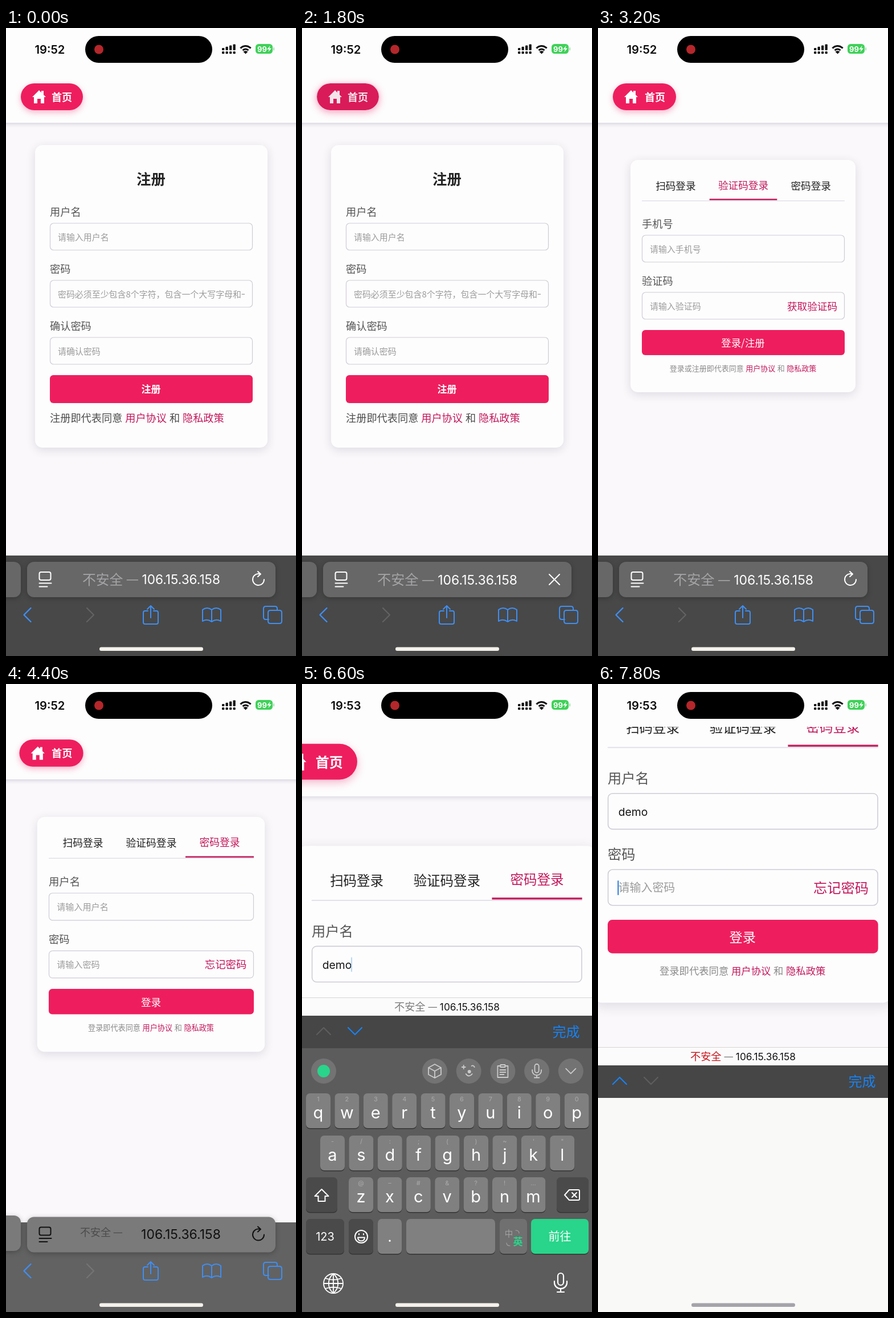
Write an HTML page with a canvas that moves like this. It is 509 px wide and 1100 px high and loops after 8 s.

```html
<!DOCTYPE html>
<html lang="zh-CN">
<head>
<meta charset="utf-8">
<title>注册与登录</title>
<style>
html, body { margin: 0; width: 100%; height: 100%; overflow: hidden; background: #faf8fa; }
canvas { display: block; width: 509px; height: 1100px; }
</style>
</head>
<body>
<canvas id="stage" width="509" height="1100"></canvas>
<script>
const ctx = document.getElementById('stage').getContext('2d');
const W = 509, H = 1100, LOOP = 8000, STEP = 200;
const CJK = '"Noto Sans CJK SC", "Noto Sans CJK", "Noto Sans", sans-serif';
const LATIN = 'Inter, "Liberation Sans", sans-serif';
const PINK = '#ee1e5e', LINK = '#c2185b', BLUE = '#3f8ef2', WHITE = '#fdfdfd';
const KEY = '#808080', DARK = '#4a4a4a', GREEN = '#28d58a';
const HOST = '106.15.36.158', TYPED = 'demo';

const clamp = u => Math.min(1, Math.max(0, u));
const inOut = u => u < .5 ? 4 * u ** 3 : 1 - (2 - 2 * u) ** 3 / 2;
const out = u => 1 - (1 - u) ** 3;
const isCjk = s => /[\u3000-\uffff]/.test(s);

function setFont(s, size, weight = 400) {
  ctx.font = `${weight} ${size}px ${isCjk(s) ? CJK : LATIN}`;
}

// y is the visual middle of the capitals
function txt(s, x, y, size, color, align = 'left', weight = 400) {
  setFont(s, size, weight);
  ctx.textAlign = align;
  ctx.fillStyle = color;
  ctx.fillText(s, x, y + size * .37);
  return ctx.measureText(s).width;
}

function runs(parts, x, y, size, centered) {
  const gap = size * .27;
  const sizes = parts.map(([s]) => s === '—' ? size * .85 : isCjk(s) ? size : size * .95);
  if (centered) {
    const total = parts.reduce((sum, [s], i) => {
      setFont(s, sizes[i]);
      return sum + ctx.measureText(s).width + gap;
    }, -gap);
    x -= total / 2;
  }
  parts.forEach(([s, color], i) => { x += txt(s, x, y, sizes[i], color) + gap; });
}

function box(x, y, w, h, r, fill, border) {
  ctx.beginPath();
  ctx.roundRect(x, y, w, h, r);
  if (fill) { ctx.fillStyle = fill; ctx.fill(); }
  if (border) { ctx.strokeStyle = border; ctx.lineWidth = 1.2; ctx.stroke(); }
}

// canvas shadows ignore the transform, so scale them here
function shadowed(color, blur, dy, draw) {
  const scale = ctx.getTransform().a;
  ctx.save();
  ctx.shadowColor = color;
  ctx.shadowBlur = blur * scale;
  ctx.shadowOffsetY = dy * scale;
  draw();
  ctx.restore();
}

function disc(x, y, r, color) {
  ctx.beginPath();
  ctx.arc(x, y, r, 0, 7);
  ctx.fillStyle = color;
  ctx.fill();
}

function icon(d, x, y, color, width = 2, filled) {
  ctx.save();
  ctx.translate(x, y);
  ctx.lineCap = ctx.lineJoin = 'round';
  ctx.lineWidth = width;
  ctx.strokeStyle = ctx.fillStyle = color;
  const path = new Path2D(d);
  filled ? ctx.fill(path) : ctx.stroke(path);
  ctx.restore();
}

const ICON = {
  house: 'M0-12L12 0H9V11H3V3H-3V11H-9V0H-12L-6-6V-6Z M4-11H8V-4L4-8Z',
  back: 'M6-12L-6 0L6 12',
  next: 'M-6-12L6 0L-6 12',
  up: 'M-12 6L0-6L12 6',
  down: 'M-12-6L0 6L12-6',
  share: 'M-5-7H-10Q-13-7-13-4V13Q-13 16-10 16H10Q13 16 13 13V-4Q13-7 10-7H5M0 5V-16M-6-10L0-16L6-10',
  book: 'M0 12Q-8 6-16 11V-9Q-8-15 0-9Q8-15 16-9V11Q8 6 0 12V-9',
  tabs: 'M-7 8H-12Q-16 8-16 4V-11Q-16-15-12-15H4Q8-15 8-11V-8M-4-8H12Q16-8 16-4V11Q16 15 12 15H-4Q-8 15-8 11V-4Q-8-8-4-8Z',
  page: 'M-7-13H7Q10-13 10-10V-2Q10 1 7 1H-7Q-10 1-10-2V-10Q-10-13-7-13ZM-10 6.5H11M-10 12.5H4',
  reload: 'M10 0A10 10 0 1 1 3-9.5M-1-14L4-9.5L-1-5',
  close: 'M-9-9L9 9M9-9L-9 9',
  erase: 'M-5-9H11Q13-9 13-7V7Q13 9 11 9H-5L-13 0ZM0-4L8 4M8-4L0 4',
  face: 'M-11 0A11 11 0 1 0 11 0A11 11 0 1 0-11 0M-6 1.5H6Q5.5 7.5 0 7.5Q-5.5 7.5-6 1.5ZM-4-5V-3.5M4-5V-3.5',
  globe: 'M-17 0A17 17 0 1 0 17 0A17 17 0 1 0-17 0H17M0-17V17M0-17C-11-8-11 8 0 17C11 8 11-8 0-17M-14-9Q0-4 14-9M-14 9Q0 4 14 9',
  mic: 'M-5-11A5 5 0 0 1 5-11V0A5 5 0 0 1-5 0ZM-11-2V1A11 10 0 0 0 11 1V-2M0 11V17M-6 17H6',
  cube: 'M0-12L11-6V6L0 12L-11 6V-6ZM-11-6L0 0L11-6M0 0V12',
  magic: 'M-5 5Q0 12 6 5M-9-10V-4M-12-7H-6M5-9Q8-11 10-7',
  clip: 'M-4-9H-9V11H9V-9H4M-4-11H4V-7H-4ZM-5-2H5M-5 2H5M-5 6H2',
  shift: 'M0-11L12 1H6V10H-6V1H-12Z',
  bolt: 'M2-6L-4 1H0L-2 6L4-1H0Z'
};

function homeButton(wide, pressed) {
  const w = wide ? 111 : 109, fg = pressed ? '#f3e4ea' : '#fff';
  shadowed(`rgba(233,30,99,${pressed ? .45 : .32})`, pressed ? 14 : 11, pressed ? 3 : 4, () =>
    box(26, 97, w, 47, 23.5, pressed ? '#d91b59' : PINK));
  if (pressed) box(25.5, 96.5, w + 1, 48, 24, null, '#f7cbdc');
  icon(ICON.house, 58, 121, fg, 1, true);
  txt('首页', wide ? 82 : 80, 121, 18, fg, 'left', 600);
}

function card(x, y, w, h) {
  shadowed('rgba(60,50,100,.15)', 16, 4, () => box(x, y, w, h, 13, WHITE));
}

function field(label, y, hint, value = '') {
  txt(label, 77, y, 18.2, '#555');
  box(77.5, y + 20, 355, 47, 6, '#fdfdfe', '#cfccd6');
  ctx.save();
  ctx.beginPath();
  ctx.rect(90, y + 21, 329, 45);
  ctx.clip();
  if (value) txt(value, 91, y + 44, 14.5, '#151515');
  else txt(hint, 91, y + 44, 14.95, '#9b9b9b');
  ctx.restore();
}

function caret(y, value, color) {
  setFont('a', 14.5);
  ctx.fillStyle = color;
  ctx.fillRect(90 + ctx.measureText(value).width, y - 9.5, 1.6, 19);
}

function signUp() {
  card(51, 205, 408, 530);
  txt('注册', 254.5, 265, 25.4, '#262626', 'center', 600);
  field('用户名', 322, '请输入用户名');
  field('密码', 422, '密码必须至少包含8个字符，包含一个大写字母和一个小写字母');
  field('确认密码', 522, '请确认密码');
  box(77, 608, 356, 49, 6, PINK);
  txt('注册', 254.5, 633, 17, '#fff', 'center', 600);
  runs([['注册即代表同意', '#4c4c4c'], ['用户协议', LINK], ['和', '#4c4c4c'], ['隐私政策', LINK]], 77, 683, 18.2);
}

function signIn(s) {
  card(57, 231, 395, 407);
  const third = 356 / 3;
  ctx.fillStyle = '#e2dfe8';
  ctx.fillRect(77, 302, 356, 1.4);
  ['扫码登录', '验证码登录', '密码登录'].forEach((label, i) => {
    const on = i === s.tab;
    txt(label, 77 + third * (i + .5), on ? 275.5 : 276.5, 17.6, on ? LINK : '#222', 'center');
    if (!on) return;
    ctx.fillStyle = '#c4215f';
    ctx.fillRect(77 + third * i, 299, third, 2.6);
  });
  const byCode = s.tab === 1;
  if (byCode) {
    field('手机号', 343, '请输入手机号');
    field('验证码', 443, '请输入验证码');
    txt('获取验证码', 420, 487, 17.6, LINK, 'right');
  } else {
    field('用户名', 343, '请输入用户名', s.value);
    field('密码', 443, '请输入密码');
    txt('忘记密码', 420.5, 487, 18.2, LINK, 'right');
  }
  box(77, 529, 356, 44, 6, PINK);
  txt(byCode ? '登录/注册' : '登录', 254.5, 552, 17.4, '#fff', 'center');
  runs([[byCode ? '登录或注册即代表同意' : '登录即代表同意', '#8a8a8a'], ['用户协议', LINK],
    ['和', '#8a8a8a'], ['隐私政策', LINK]], 254.5, 596, 13, true);
  if (s.focus === 1) caret(387, s.value, '#b9d9f2');
  if (s.focus === 2) caret(487, '', '#2f7fd8');
}

function page(s) {
  ctx.save();
  ctx.beginPath();
  ctx.rect(0, 75, W, H);
  ctx.clip();
  const zoom = 1 + s.zoom / 3;
  ctx.translate(-85.7 * s.zoom, -24.6 * s.zoom - 267.7 * s.scroll);
  ctx.scale(zoom, zoom);
  shadowed('rgba(50,40,100,.2)', 7, 2, () => {
    ctx.fillStyle = WHITE;
    ctx.fillRect(-20, -100, 600, 266);
  });
  homeButton(s.login, s.pressed);
  s.login ? signIn(s) : signUp();
  ctx.restore();
}

function statusBar(clock) {
  ctx.fillStyle = WHITE;
  ctx.fillRect(0, 0, W, 75);
  txt(clock, 77, 37.5, 20.2, '#0a0a0a', 'center', 600);
  box(139, 14, 223, 47, 23.5, '#000');
  disc(163, 37.5, 8, '#b4272b');
  for (let i = 0; i < 4; i++) {
    const x = 379 + i * 6.5, h = 4 + i * 2.2;
    box(x, 39 - h, 4.3, h, 1.2, '#111');
    box(x, 41, 4.3, 4.3, 1.4, '#111');
  }
  ctx.strokeStyle = '#111';
  ctx.lineCap = 'butt';
  ctx.lineWidth = 3;
  [6.5, 12].forEach(r => {
    ctx.beginPath();
    ctx.arc(420.5, 43.5, r, -Math.PI * .77, -Math.PI * .23);
    ctx.stroke();
  });
  icon('M0 2L-4-2Q0-5 4-2Z', 420.5, 43.5, '#111', 1, true);
  box(438, 28, 30, 17, 5.5, '#3fd158');
  box(469, 34, 2, 5.5, 1, '#a9dfb2');
  txt('99', 449.5, 36.8, 13, '#fff', 'center', 700);
  icon(ICON.bolt, 462, 36.5, '#fff', 1, true);
}

function indicator(color) {
  box(164, 1084.5, 182, 6.5, 3.25, color);
}

function browserBar(s) {
  const fading = s.barFade, fg = fading ? '#111' : '#fff';
  const pill = fading ? '#7a7a7a' : '#676768';
  const top = fading ? 943 : 924, y = fading ? 933.5 : 935;
  ctx.fillStyle = fading ? '#626262' : '#484848';
  ctx.fillRect(0, top, W, H - top);
  shadowed('rgba(0,0,0,.25)', 10, 2, () => {
    box(-40, fading ? 931 : y, 66, 62, 12, pill);
    box(37, y, 436, 62, 12, pill);
  });
  const mid = y + 31;
  icon(ICON.page, 68.5, mid, fg);
  icon(s.loading ? ICON.close : ICON.reload, 443, mid, fg);
  if (fading) {
    runs([['不安全', '#4b4b4b'], ['—', '#4b4b4b']], 130, 960, 18);
    txt(HOST, 307, 963.5, 23, fg, 'center');
  } else {
    runs([['不安全', '#a4a4a6'], ['—', '#a4a4a6'], [HOST, fg]], 255, mid, s.settled ? 24.2 : 23.8, true);
  }
  icon(ICON.back, 37.5, 1028, BLUE, 2.4);
  icon(ICON.next, 148, 1028, fading ? '#747474' : '#626264', 2.4);
  icon(ICON.share, 254, 1028, BLUE);
  icon(ICON.book, 361, 1028, BLUE);
  icon(ICON.tabs, 468, 1028, BLUE);
  indicator('#f4f1ea');
}

function addressStrip(top, warn) {
  ctx.fillStyle = '#fcfbfc';
  ctx.fillRect(0, top, W, 32);
  ctx.fillStyle = '#d8d5d4';
  ctx.fillRect(0, top, W, 1);
  runs([['不安全', warn ? '#c4161c' : '#7b7b7b'], ['—', '#777'], [HOST, '#111']], 254.5, top + 16.5, 18.2, true);
}

function accessory(top, second) {
  ctx.fillStyle = '#464646';
  ctx.fillRect(0, top, W, 57);
  const on = '#1783f5', off = '#5e5e5e';
  icon(ICON.up, 38, top + 27, second ? on : off, 2.2);
  icon(ICON.down, 93, top + 27, second ? off : on, 2.2);
  txt('完成', 487.5, top + 28, 24, on, 'right', 500);
}

function key(x, y, w, h, fill, label, size = 19, hint) {
  box(x, y + 1.5, w, h, 7, '#343434');
  box(x, y, w, h, 7, fill);
  if (label) txt(label, x + w / 2, y + h / 2, size, '#fff', 'center');
  if (hint) txt(hint, x + w - 8, y + 10, 11, '#aaa', 'center');
}

function langKey(x, y, w, h, english) {
  key(x, y, w, h, '#707070');
  const c = x + w / 2, dim = '#a3a3a3';
  txt('中', c - 8, y + 26, english ? 14.5 : 18, english ? dim : '#fff', 'center', english ? 400 : 600);
  txt('英', c + 8, y + 40, english ? 17 : 15, english ? GREEN : dim, 'center', english ? 600 : 400);
  icon('M4-13Q10-13 10-8M-12 9Q-12 14-6 14', c, y + 33, dim, 1.2);
}

function pinyinKeys() {
  key(8, 714, 83, 213, DARK);
  ctx.fillStyle = '#555';
  [767, 820, 874].forEach(y => ctx.fillRect(8, y, 83, 1));
  txt('，', 54, 745, 19, '#fff', 'center');
  txt('。', 55, 798, 19, '#fff', 'center');
  txt('?', 49, 848, 19, '#fff', 'center');
  txt('!', 50, 901, 19, '#fff', 'center');
  ['@#', 'ABC', 'DEF', 'GHI', 'JKL', 'MNO', 'PQRS', 'TUV', 'WXYZ'].forEach((s, i) =>
    key(99 + i % 3 * 106.6, 714 + Math.floor(i / 3) * 73.7, 99, 66, KEY, s, 22.5, String(i + 1)));
  key(419, 714, 84, 66, DARK);
  icon(ICON.erase, 460, 747.5, '#fff');
  key(419, 788, 84, 66, DARK, '换行', 19);
  key(419, 861.5, 84, 66, DARK);
  icon(ICON.face, 461, 895, '#fff');
  key(8, 935, 83, 66, DARK, '符号', 19);
  key(99, 935, 64, 66, '#707070', '123', 19);
  key(171, 935, 168, 66, KEY, '', 19, '0');
  langKey(347, 935, 64, 66, false);
  key(419, 935, 84, 66, GREEN, '前往', 20);
}

function letterRow(x, y, letters, hints) {
  [...letters].forEach((c, i) => {
    const kx = x + i * 50.4;
    key(kx, y, 43, 61, KEY);
    setFont(c, 29);
    ctx.textAlign = 'center';
    ctx.fillStyle = '#fff';
    ctx.fillText(c, kx + 21.5, y + 43.5);
    txt(hints[i], kx + 21.5, y + 10, 11, '#aaa', 'center');
  });
}

function latinKeys() {
  letterRow(7, 717, 'qwertyuiop', '1234567890');
  letterRow(32, 791, 'asdfghjkl', '-/:;()~\'"');
  letterRow(82, 864, 'zxcvbnm', '@–#&?!…');
  key(7, 864, 55, 61, DARK);
  icon(ICON.shift, 34.5, 896, '#fff');
  key(447, 864, 56, 61, DARK);
  icon(ICON.erase, 474, 895, '#fff');
  key(7, 937, 67, 61, DARK, '123', 20);
  key(82, 937, 43, 61, DARK);
  icon(ICON.face, 104, 968, '#fff');
  key(133, 937, 42, 61, KEY, '.', 26);
  key(183, 937, 156, 61, KEY);
  langKey(347, 937, 48, 61, true);
  key(402, 937, 101, 61, GREEN, '前往', 20);
}

function keyboard(dy, english) {
  ctx.save();
  ctx.translate(0, dy);
  ctx.fillStyle = '#5c5c5c';
  ctx.fillRect(0, 638, W, H);
  disc(38, 678, 22, '#737373');
  disc(38, 678, 11, GREEN);
  const tools = ['cube', 'magic', 'clip', 'mic', 'down'];
  tools.forEach((tool, i) => {
    const x = 233 + i * 59.7, grey = '#cbcbcb';
    disc(x, 678, 22, '#737373');
    ctx.save();
    ctx.translate(x, 678);
    const k = tool === 'mic' || tool === 'down' ? .72 : 1;
    ctx.scale(k, k);
    icon(ICON[tool], 0, tool === 'mic' ? -1 : 0, grey, 1.8 / k);
    ctx.restore();
    if (tool === 'magic') disc(x + 1, 679, 3, grey);
  });
  english ? latinKeys() : pinyinKeys();
  icon(ICON.globe, 55, 1050, '#fff', 1.8);
  icon(ICON.mic, 454, 1048, '#fff', 2.2);
  ctx.restore();
}

function stateAt(t) {
  const typed = Math.floor((t - 5800) / 200) + 1;
  return {
    clock: t < 4800 ? '19:52' : '19:53',
    settled: t >= 200,
    pressed: t >= 1400 && t < 2400,
    loading: t >= 1800 && t < 2600,
    login: t >= 2400,
    tab: t < 3600 ? 1 : 2,
    barFade: t >= 4400,
    zoom: inOut(clamp((t - 4278) / 600)),
    rise: out(clamp((t - 4400) / 600)),
    english: t >= 5600,
    value: TYPED.slice(0, Math.max(0, typed)),
    focus: t < 4800 ? 0 : t < 7000 ? 1 : 2,
    scroll: out(clamp((t - 7000) / 600)),
    warn: t >= 7800
  };
}

function draw(t) {
  const s = stateAt(t);
  ctx.fillStyle = '#faf8fa';
  ctx.fillRect(0, 0, W, H);
  page(s);
  statusBar(s.clock);
  if (s.rise === 0) return browserBar(s);
  const top = 581 + (1 - s.rise) * 551 + s.scroll * 87;
  ctx.fillStyle = '#f9f9f7';
  ctx.fillRect(0, top, W, H);
  keyboard((1 - s.rise) * 551 + s.scroll * 470, s.english);
  addressStrip(top - 32, s.warn);
  accessory(top, s.focus === 2);
  indicator(s.scroll > .9 ? '#a5a3aa' : '#f4f1ea');
}

function tick(now) {
  draw(Math.floor(now % LOOP / STEP) * STEP);
  requestAnimationFrame(tick);
}
draw(0);
requestAnimationFrame(tick);
</script>
</body>
</html>
```
